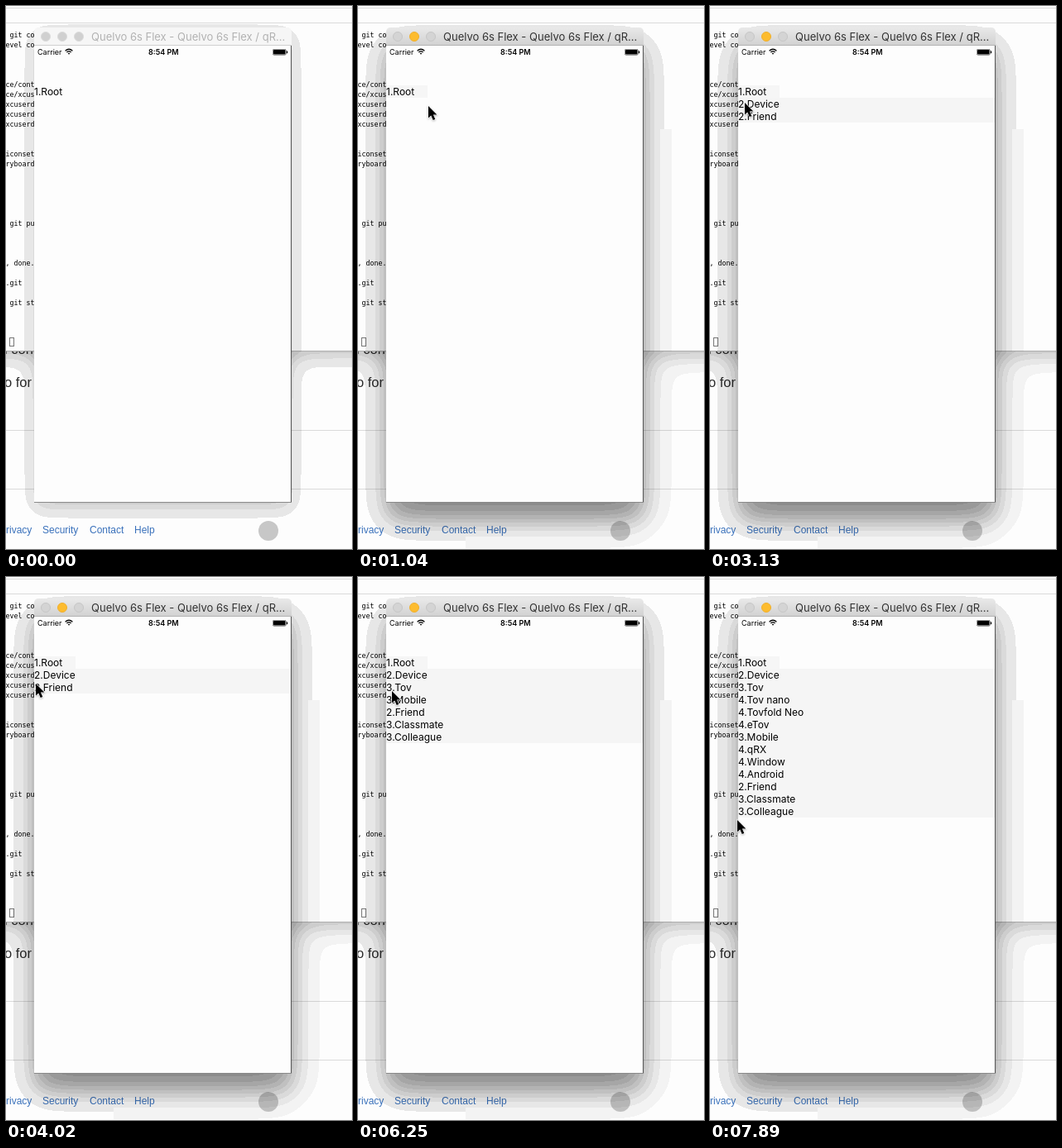
Write an HTML page with a canvas that moves like this. It is 418 px wide and 657 px high and loops after 8 s.

```html
<!DOCTYPE html>
<html lang="en">
<head>
<meta charset="utf-8">
<title>Tree list demo</title>
<style>
html, body { margin: 0; width: 100%; height: 100%; overflow: hidden; background: #fff; }
#stage { position: relative; width: 418px; height: 657px; overflow: hidden; isolation: isolate; background: #fff; }
#stage div, #stage span, #stage canvas, #stage svg { position: absolute; white-space: pre; }
.page { font: 12px/16px "Liberation Sans", Arial, sans-serif; color: #3a72bd; }
.page .link { top: 626px; }
.page .big { left: -2px; font-size: 16.5px; line-height: 20px; color: #2c2c2c; }
.line { left: 0; width: 418px; height: 1px; background: #dcdcdc; }
#logo { left: 305px; top: 623px; width: 24px; height: 24px; border-radius: 50%; background: #c9c9c9; }
#term { left: 0; top: 0; width: 418px; height: 417px; background: #fff; border-bottom: 1px solid #b0b0b0;
  font: 8.3px/12px "DejaVu Sans Mono", monospace; color: #000; }
#log { left: -.6px; top: 29px; }
#caret { left: 4px; top: 401px; width: 4px; height: 9px; border: 1px solid #777; }
#shade { left: 0; top: 0; mix-blend-mode: multiply; }
#bar { left: 34px; top: 26px; width: 311px; height: 21px; border-radius: 5px 5px 0 0; background: #f6f6f6;
  border-bottom: 1px solid #d0d0d0; color: #b2b2b2; font: 13px/22px Inter, Roboto, sans-serif; }
#bar span { left: 69px; top: 0; }
#bar i { position: relative; float: left; margin: 5px 0 0 8px; width: 10px; height: 10px;
  border: 1px solid #dadada; border-radius: 50%; background: #d0d0d0; }
.on #bar { background: linear-gradient(#e9e9e9, #d2d2d2); border-color: #b3b3b3; color: #333; }
.on #bar i { background: #d4d4d4; border-color: #c6c6c6; }
.on #bar i:nth-child(2) { background: #fdbc2f; border-color: #f0b02d; }
#screen { left: 34px; top: 48px; width: 310px; height: 552px; background: #fdfdfd; border: solid #555; border-width: 0 1px 0 0;
  box-shadow: 0 1px #8a8a8a; color: #000; font: 9px/12px Inter, Roboto, sans-serif; }
#screen span { top: 2px; }
#rows { left: 0; top: 48px; width: 310px; font-size: 12px; line-height: 15px; }
#rows div { position: static; height: 15px; background: #f5f5f5; }
#rows div:first-child { width: 50px; background: none; }
.moved #rows div:first-child { background: #f6f6f6; }
#arrow { left: 0; top: 0; overflow: visible; filter: drop-shadow(0 1px 1px #0004); }
</style>
</head>
<body>
<div id="stage">
  <div class="page">
    <span class="big" style="top:405px">l con</span>
    <span class="big" style="top:445px">o for</span>
    <div class="line" style="top:513px"></div>
    <div class="line" style="top:584px"></div>
    <span class="link" style="left:-8px">Privacy</span>
    <span class="link" style="left:44px">Security</span>
    <span class="link" style="left:101px">Contact</span>
    <span class="link" style="left:155px">Help</span>
    <div id="logo"></div>
  </div>
  <div id="term">
    <div class="line" style="top:2px"></div>
    <div class="line" style="top:20px"></div>
    <div id="log"> git co
evel co



ce/cont
ce/xcus
xcuserd
xcuserd
xcuserd


iconset
ryboard





 git pu



, done.

.git

 git st</div>
    <div id="caret"></div>
  </div>
  <canvas id="shade" width="418" height="657"></canvas>
  <div id="bar"><i></i><i></i><i></i><span>Quelvo 6s Flex - Quelvo 6s Flex / qR...</span></div>
  <div id="screen">
    <span style="left:4px">Carrier</span>
    <svg style="left:37px;top:3px" width="10" height="9" fill="none" stroke="#000" stroke-width="1.3">
      <path d="M.6 3.2Q5-.8 9.4 3.2M2.4 5Q5 2.8 7.6 5"/><path d="M3.7 6.2Q5 5.2 6.3 6.2L5 7.8Z" fill="#000" stroke="none"/>
    </svg>
    <span style="left:138px;font-weight:600">8:54 PM</span>
    <svg style="left:288px;top:4px" width="19" height="8">
      <rect x=".3" y=".3" width="16" height="7" rx="1.6" fill="none" stroke="#000" stroke-width=".5"/>
      <rect x="1" y="1" width="14.6" height="5.6" rx="1"/><rect x="17" y="2.3" width="1.2" height="3" rx=".6"/>
    </svg>
    <div id="rows"></div>
  </div>
  <svg id="arrow" width="12" height="19"><path d="M0 0V14.5L3.3 11.5 5.7 17 8.3 15.9 5.9 10.5H10.4Z" stroke="#fff" stroke-width="1.2" paint-order="stroke"/></svg>
</div>
<script>
const $ = id => document.getElementById(id);
const W = 418, H = 657, LOOP = 8000;

const tickAt = t => Math.floor((t + 15) / 148.8);
const ACTIVE = 2, MOVED = 5;

// Tree nodes; "open" is when a node's children unfold
const leaf = name => ({ name });
const tree = {
  name: 'Root', open: 17, kids: [
    { name: 'Device', open: 38, kids: [
      { name: 'Tov', open: 50, kids: ['Tov nano', 'Tovfold Neo', 'eTov'].map(leaf) },
      { name: 'Mobile', open: 46, kids: ['qRX', 'Window', 'Android'].map(leaf) }
    ] },
    { name: 'Friend', open: 32, kids: ['Classmate', 'Colleague'].map(leaf) }
  ]
};
const rows = [];
function addRow({ name, open, kids = [] }, depth = 1, at = 0) {
  const el = document.createElement('div');
  el.textContent = `${depth}.${name}`;
  $('rows').append(el);
  rows.push({ el, at });
  for (const kid of kids) addRow(kid, depth + 1, open);
}
addRow(tree);

// Pointer strokes: it leaves the last place after "from" and rests at x, y by "to"
const strokes = [
  { from: 3, to: 4, x: 404, y: 640 },
  { from: 4, to: 5, x: 130, y: 149 },
  { from: 5, to: 10, x: 59, y: 106 },
  { from: 13, to: 15, x: 52, y: 104 },
  { from: 19, to: 25, x: 34, y: 128 },
  { from: 26, to: 34, x: 41, y: 131 },
  { from: 35, to: 38, x: 39, y: 121 },
  { from: 39, to: 42, x: 41, y: 138 },
  { from: 47, to: 49, x: 41, y: 130 },
  { from: 51, to: 53, x: 33, y: 294 }
];
const easeOut = p => 1 - (1 - p) ** 2;
function pointer(n) {
  let x = W, y = H;
  for (const s of strokes) {
    const p = easeOut(Math.min(1, Math.max(0, (n - s.from) / (s.to - s.from))));
    x += (s.x - x) * p;
    y += (s.y - y) * p;
  }
  return [Math.round(x), Math.round(y)];
}

// Soft box shadow, one axis: smoothed step at both ends
const step = z => 1 / (1 + Math.exp(-1.702 * z));
const profile = (n, a, b, s) => Array.from({ length: n }, (_, i) => step((i + .5 - a) / s) * step((b - i - .5) / s));

// Grey bands of the reduced palette
function band(v, fine) {
  if (fine && v > 237 && v < 248) return 243;
  const k = Math.round((244 - v) / 13);
  return v > 242 ? 253 : 244 - 13 * Math.max(1, k);
}

function shadow(alpha, sigma, drop, fine) {
  const img = new ImageData(W, H);
  const px = profile(W, 34, 345, sigma), py = profile(H, 26 + drop, 600 + drop, sigma);
  const back = profile(H, -300, 425, 12.6);
  for (let y = 0; y < H; y++) for (let x = 0; x < W; x++) {
    const under = y > 417 ? 1 - .25 * back[y] : 1;
    const v = 253 * under * (1 - alpha * px[x] * py[y]);
    const g = band(v, fine && x >= 130 && y >= 149);
    img.data.set([g, g, g, 255], (y * W + x) * 4);
  }
  return img;
}
const shades = [shadow(.25, 12.6, 8), shadow(.5, 18, 22), shadow(.5, 18, 22, true)];
const ctx = $('shade').getContext('2d');
let shown = -1;

function draw(t) {
  const n = tickAt(t), phase = (n >= ACTIVE) + (n >= MOVED);
  if (phase !== shown) {
    ctx.putImageData(shades[phase], 0, 0);
    $('stage').className = ['', 'on', 'on moved'][phase];
    shown = phase;
  }
  for (const { el, at } of rows) el.style.display = n >= at ? 'block' : 'none';
  const [x, y] = pointer(n);
  $('arrow').style.transform = `translate(${x}px,${y}px)`;
}

const start = performance.now();
function frame() {
  draw((performance.now() - start) % LOOP);
  requestAnimationFrame(frame);
}
frame();
</script>
</body>
</html>
```
